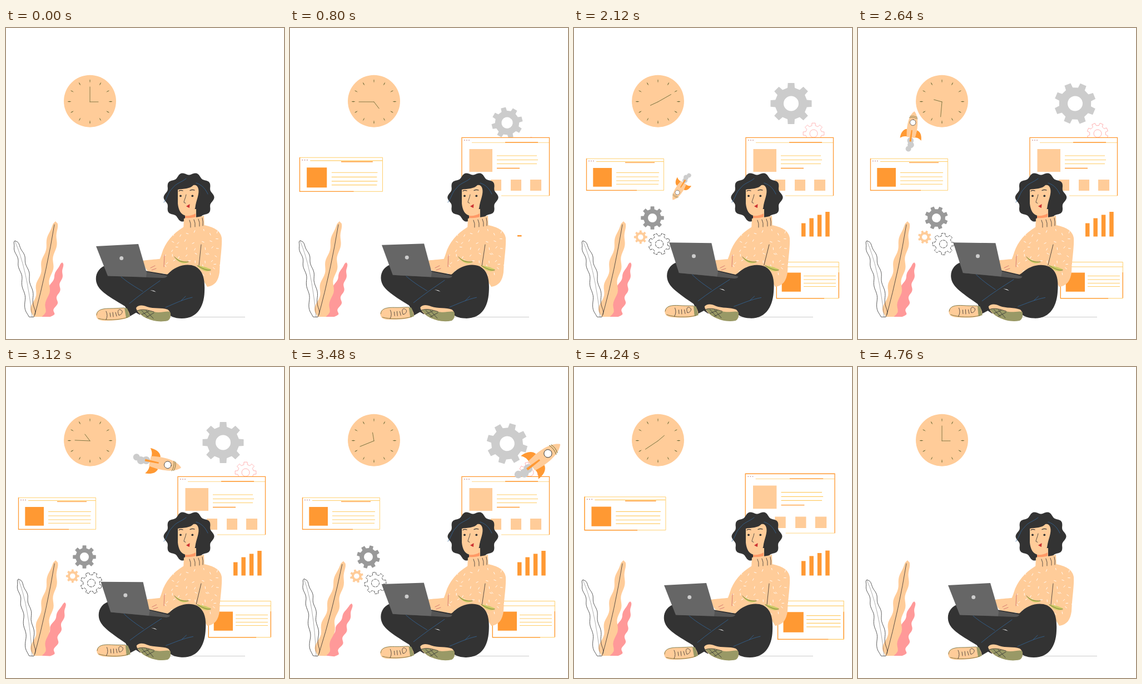
An HTML page for the animation above (4.8 s loop, 500x560 px).

```html
<!DOCTYPE html>
<html lang="en">
<head>
<meta charset="utf-8">
<title>Working with a laptop</title>
<style>
html, body { margin: 0; width: 100%; height: 100%; overflow: hidden; background: #fff; }
svg { display: block; width: 500px; height: 560px; }
.ln { fill: none; stroke: #333; stroke-width: .8; stroke-linecap: round; stroke-linejoin: round; }
.blue { stroke: #369; }
.olive { stroke: #663; }
.rose { stroke: #c66; }
.bold { stroke-width: 1.3; }
.yellow { stroke: #fc6; }
.orange { stroke: #f93; stroke-width: 1.3; }
.dots { stroke: #c99; stroke-width: 1.8; stroke-linecap: round; stroke-dasharray: 0 4; }
</style>
</head>
<body>
<svg viewBox="0 0 500 560" xmlns="http://www.w3.org/2000/svg">
  <path d="M290 520.5H430" stroke="#ccc"/>

  <circle cx="151" cy="131.7" r="47" fill="#fc9"/>
  <g id="ticks" fill="#663"></g>
  <path id="minute" class="ln olive" d="M151 133V106"/>
  <path id="hour" class="ln olive" d="M151 133V118"/>

  <path id="bigGear" fill="#ccc" fill-rule="evenodd"/>
  <path id="rimGear" fill="#fff" stroke="#f99" stroke-width=".7" fill-rule="evenodd"/>

  <g id="winR" fill="none">
    <path d="M309 197H467V302H309Z" fill="#fff"/>
    <path class="yellow" d="M327 206.3H466M380 302H466" stroke-width=".8"/>
    <path class="yellow" d="M372 230H444M372 237.5H446M372 244.5H444" stroke-width="1.2"/>
    <path class="orange" d="M309 302V197.3H466.5V302M387 206H446M372 252.5H413"/>
    <path class="dots" d="M314 202h9"/>
    <path d="M322.5 218h41.5v41h-41.5zM361 273h19v20h-19zM397 273h19v20h-19zM432 273h20v20h-20z" fill="#fc9"/>
  </g>

  <g id="winL" fill="none">
    <path class="yellow" d="M22.5 235.3H161.5V292.3H22.5Z" fill="#fff" stroke-width=".9"/>
    <path class="yellow" d="M40 240.5H161M76 260.5H153M76 268H152M76 275H153M76 281.3H152" stroke-width="1.1"/>
    <path class="orange" d="M22.5 235V292.3H113M92 242.3H145"/>
    <path class="dots" d="M27 239.5h9"/>
    <path d="M34.3 252h33.7v33.7h-33.7z" fill="#f93"/>
  </g>

  <g id="winB" fill="none">
    <path class="yellow" d="M364.3 421.5H476.3V486.8H364.3Z" fill="#fff"/>
    <path class="yellow" d="M380 430H476M413 446.5H471M413 453H471M413 459.5H471M413 465.5H471" stroke-width="1.2"/>
    <path class="orange" d="M364.3 422V486.8H450M476.3 440V486"/>
    <path d="M373.7 440.5h34.3v34.3h-34.3z" fill="#f93"/>
  </g>

  <g id="bars" fill="#f93"></g>

  <path id="pinkLeaf" fill="#f99"/>
  <g id="tanLeaf">
    <path id="tanShape" fill="#fc9"/>
    <path class="ln" d="M87 354Q74 434 52 516"/>
  </g>
  <g id="rimLeaf">
    <path id="rimShape" class="ln"/>
    <path class="ln" d="M16 384Q37 430 47 520" stroke-opacity=".5"/>
  </g>

  <g id="gears">
    <path id="darkGear" fill="#999" fill-rule="evenodd"/>
    <path id="tanGear" fill="#fc9" fill-rule="evenodd"/>
    <path id="lineGear" fill="#fff" stroke="#333" stroke-width=".8" stroke-dasharray="5 1.2" fill-rule="evenodd"/>
  </g>

  <g id="rocket">
    <g fill="#ccc"><circle cx="-20" r="7"/><circle cx="-29" cy="2" r="7"/><circle cx="-38" cy="-2" r="6"/></g>
    <path d="M4-11C2-20-8-23-17-23C-12-17-12-13-12-8ZM4 11C2 20-8 23-17 23C-12 17-12 13-12 8Z" fill="#f93"/>
    <path d="M44 0C36-9 16-14-13-9L-13 9C16 14 36 9 44 0Z" fill="#fc9"/>
    <path d="M-22-2L3-1.3V1.3L-22 2Z" fill="#f93"/>
    <path class="ln olive" d="M29-9Q32 0 29 9M32-8Q35 0 32 8"/>
    <circle class="ln" cx="19.5" r="6.3" style="fill:#fff"/>
  </g>

  <clipPath id="knit"><path id="knitShape"/></clipPath>
  <path id="hair" fill="#333"/>
  <g id="hand">
    <path d="M246 419C258 417 270 417 290 414L296 442L262 442C254 439 250 433 246 419Z" fill="#fc9"/>
    <path class="ln rose" d="M260 432L268 428M262 436L270 433"/>
  </g>
  <path id="sweater" fill="#fc9"/>
  <path id="flecks" fill="none" stroke="#fff" stroke-width=".9" clip-path="url(#knit)"/>
  <path d="M322 326H342V345H322Z" fill="#fc9"/>
  <path d="M322 338Q333 339 341 334V340Q332 344 322 342Z" fill="#f96"/>
  <path d="M320 343C331 342 345 341 356 338L357 362L319 363Z" fill="#fc9"/>
  <path class="ln" d="M330 346Q333 352 332 359M338 345Q341 351 340 358M346 344Q349 350 348 357M353 342Q355 349 354 356"/>
  <path class="ln rose" d="M285 409L284 430"/>
  <path id="armLine" class="ln" d="M351 390L347 428"/>
  <path d="M303 412C311 418 318 421 329 421C319 427 309 422 303 412ZM343 427C352 429 360 430 369 435C363 441 352 438 343 427Z" fill="#cc6"/>
  <path class="ln olive" d="M303 412C309 420 317 422 328 421M344 428C353 433 361 437 368 436"/>

  <path d="M309 291C319 289 331 290 337 283C344 281 348 289 346 299C345 306 342 312 341 319C340 332 332 338 324 338C315 337 310 328 309 316Z" fill="#fc9"/>
  <path class="ln bold" d="M311 293.500Q314 291.500 318 293M331 292.500Q335 290.500 339 292"/>
  <path class="ln" d="M324 300C323 306 320 311 320 314L323 315.500"/>
  <g fill="#333"><circle cx="314" cy="302.300" r="1.900"/><circle cx="335.300" cy="302.300" r="1.900"/></g>
  <path d="M324 321L330.500 317L330 324Q327 323 324 321Z" fill="#c33"/>
  <path class="ln blue" d="M284 314C291 305 291 296 299 289C306 279 316 278 324 271M342 279C354 283 359 291 363 299"/>

  <g id="legL">
    <path d="M183 426C164 431 158 448 164 462C170 476 190 487 240 516L290 510L272 481L298 445Z" fill="#333"/>
    <path class="ln blue" d="M207 448C222 461 239 470 256 480"/>
  </g>
  <g id="legR">
    <path d="M213 499L224 490L291 443C305 428 325 423 340 429C355 437 358 453 357 475C356 502 344 523 316 523C302 523 290 518 284 505L252 502L223 519Z" fill="#333"/>
    <path d="M259 472L270 475.500L266 473Z" fill="#fff"/>
    <path class="ln blue" d="M222 496C240 481 257 469 277 455M287 503C302 497 317 489 335 485M315 491L323 483"/>
  </g>
  <g id="lap">
    <path d="M162 517C163 507 174 505 188 505C200 505 210 503 217 505Q224 515 222 520C212 526 194 527 178 527C168 527 163 525 162 517Z" fill="#fc9"/>
    <path d="M213 504L218 505L223 520L216 522Z" fill="#996"/>
    <path class="ln olive" d="M163 517C163 507 174 505 188 505C200 505 207 504 213 504M166 523C180 527 203 526 219 521"/>
    <path class="ln" d="M180 510Q184 518 180 525M187 513L188 520M192 512L193 520M197 512L199 519M203 517C199 509 203 505 207 508C212 510 207 518 203 517"/>
    <path d="M183 446.500L252 439L290 446Q289 450 282 450Z" fill="#555"/>
    <path d="M162 393L238 389L253 440.500L252 448.500L183 446.500Z" fill="#666"/>
    <circle cx="207.700" cy="414.500" r="3.500" fill="#ccc"/>
  </g>
  <g id="shoeR">
    <path d="M234 504C238 498 247 499 254 502C266 506 280 503 291 507C298 512 297 522 292 526C275 531 256 526 245 518C238 513 235 509 234 504Z" fill="#fc9"/>
    <path d="M236 509C246 505 255 508 266 511C278 514 287 509 295 511C297 518 296 524 291 527C274 531 258 526 246 519Z" fill="#996"/>
    <path class="ln" d="M244 509L256 521M252 509L265 523M244 516L257 510M252 521L266 513M236 509C246 505 255 508 266 511"/>
  </g>
</svg>
<script>
const LOOP = 4800, RAD = Math.PI / 180;
const $ = id => document.getElementById(id);
const clamp = v => Math.max(0, Math.min(1, v));
const span = (t, a, b) => clamp((t - a) / (b - a));
const sine = p => (1 - Math.cos(Math.PI * p)) / 2;
const outCubic = p => 1 - (1 - p) ** 3;
const outBack = (p, s = 1.70158) => 1 + (s + 1) * (p - 1) ** 3 + s * (p - 1) ** 2;
// 0..1 while entering from a to b, back to 0 while leaving from c to d
const inOut = (t, a, b, c, d) => Math.min(span(t, a, b), 1 - span(t, c, d));
const pulse = (t, a, b) => Math.sin(Math.PI * span(t, a, b)) ** 2;
const set = (id, value, name = 'transform') => $(id).setAttribute(name, value);
const turn = (id, deg, x, y) => set(id, `rotate(${deg} ${x} ${y})`);
const zoom = (k, x, y) => `translate(${x} ${y}) scale(${Math.max(k, 0)}) translate(${-x} ${-y})`;
const show = (id, on) => set(id, on ? 'inline' : 'none', 'display');
const polygon = pts => 'M' + pts.map(p => p.map(v => v.toFixed(1)).join(' ')).join('L') + 'Z';
const polar = (r, deg, x = 0, y = 0) => [x + r * Math.cos(deg * RAD), y + r * Math.sin(deg * RAD)];

// Wavy leaf around a curved spine, from base to tip
function leaf(base, bend, tip, wide, taper) {
  const side = s => Array.from({ length: 41 }, (_, i) => {
    const u = i / 40;
    const [x, y] = [0, 1].map(k => (1 - u) ** 2 * base[k] + 2 * u * (1 - u) * bend[k] + u * u * tip[k]);
    const ends = Math.sqrt(Math.min(1, u * 12 + .3) * (1 - u ** 12));
    return [x + s * wide * (1 - taper * u) * ends * (1 + .2 * Math.sin(26 * u + s)), y];
  });
  return polygon([...side(-1), ...side(1).reverse()]);
}

function gear(R, root, hole) {
  const pts = [];
  for (let a = 0; a < 360; a += 45) {
    pts.push(polar(root, a - 13), polar(R, a - 9), polar(R, a + 9), polar(root, a + 13));
  }
  const half = x => `A${hole} ${hole} 0 1 0 ${x} 0`;
  return polygon(pts) + `M${hole} 0${half(-hole)}${half(hole)}Z`;
}

function build() {
  set('rimShape', leaf([45, 520], [36, 430], [16, 383], 8, .2), 'd');
  set('tanShape', leaf([56, 520], [73, 434], [89, 348], 13, .42), 'd');
  set('pinkLeaf', leaf([70, 520], [86, 475], [101, 422], 15, .7), 'd');

  const curls = Array.from({ length: 180 }, (_, i) => polar(43 + 2.5 * Math.cos(i * 20 * RAD), i * 2, 329, 305));
  set('hair', polygon(curls), 'd');

  const knit = 'M320 358C300 370 286 386 280 407C277 416 274 420 275 432L290 448L352 450L362 466C376 464 382 455 384 440C385 415 389 394 388 378C386 364 372 358 356 355Z';
  set('sweater', knit, 'd');
  set('knitShape', knit, 'd');

  let seed = 7, flecks = '';
  const rnd = () => (seed = seed * 16807 % 2147483647) / 2147483647;
  for (let i = 0; i < 56; i++) {
    const [dx, dy] = polar(4.5, rnd() * 360);
    flecks += `M${280 + i % 8 * 14 + rnd() * 9} ${365 + Math.floor(i / 8) * 13 + rnd() * 9}l${dx} ${dy}`;
  }
  set('flecks', flecks, 'd');

  for (let a = 0; a < 360; a += 30) {
    $('ticks').innerHTML += `<path d="M151 92Q152.300 95 151 99Q149.700 95 151 92Z" transform="rotate(${a} 151 132.500)"/>`;
  }
  for (let i = 0; i < 4; i++) {
    $('bars').innerHTML += `<rect id="bar${i}" x="${409 + 14.4 * i}" width="7.500"/>`;
  }

  set('bigGear', gear(37.5, 29, 13.5), 'd');
  set('rimGear', gear(19, 14.5, 7), 'd');
  set('darkGear', gear(21, 16, 8), 'd');
  set('tanGear', gear(12, 9, 4.8), 'd');
  set('lineGear', gear(19.5, 15, 7), 'd');
}

// Rocket: time, place and heading at each turn
const turns = [
  [1360, 175, 312, 200], [1520, 133, 294, 200], [2120, 193, 285, 122], [2620, 95, 200, 275],
  [3120, 271, 172, 12], [3800, 433, 47, 239], [4000, 362, -72, 239],
];
function along(t) {
  const i = Math.max(1, turns.findIndex(k => t < k[0]));
  const a = turns[i - 1], b = turns[i], gap = b[0] - a[0], u = (t - a[0]) / gap;
  const push = i === 1 || i === turns.length - 1 ? .3 : .7;
  const v = polar(gap * push, a[3]), w = polar(gap * push, b[3]);
  return [0, 1].map(k => (1 + 2 * u) * (1 - u) ** 2 * a[k + 1] + u * (1 - u) ** 2 * v[k]
    + u * u * (3 - 2 * u) * b[k + 1] + u * u * (u - 1) * w[k]);
}

function drawRocket(t) {
  const on = t > 1365 && t < 3995;
  show('rocket', on);
  if (!on) return;
  const [x, y] = along(t), [x0, y0] = along(t - 2), [x1, y1] = along(t + 2);
  const size = span(t, 1360, 1480) * Math.min(1.15, .43 + .00036 * (t - 1520));
  set('rocket', `translate(${x} ${y}) rotate(${Math.atan2(y1 - y0, x1 - x0) / RAD}) scale(${size})`);
}

function drawGears(t) {
  const spin = (t - 2120) * .045;
  const big = outCubic(inOut(t, 600, 1140, 3400, 3740));
  set('bigGear', `${zoom(big, 390.5, 276)} translate(390.5 136) rotate(${spin})`);
  const rim = outCubic(inOut(t, 740, 1180, 3620, 3960));
  set('rimGear', `translate(431 ${230 - 40 * rim}) rotate(${-spin})`);
  show('rimGear', rim > 0);
  const grow = (a, b) => outCubic(span(t, a, b));
  set('darkGear', `${zoom(grow(1370, 1820), 142, 357)} translate(141 342) rotate(${spin})`);
  set('tanGear', `${zoom(grow(1080, 1560), 127, 384)} translate(119.8 376.5) rotate(${-spin})`);
  set('lineGear', `${zoom(grow(1000, 1450), 160, 392)} translate(153.5 389) rotate(${spin + 22})`);
  set('gears', 1 - span(t, 3680, 3920), 'opacity');
}

function drawPanels(t) {
  const low = inOut(t, 1330, 2110, 4100, 4700);
  set('winR', zoom(outBack(inOut(t, 100, 560, 4100, 4700), .8), 345, 440));
  set('winL', zoom(outBack(inOut(t, 445, 935, 4120, 4700)), 92, 264));
  set('winB', zoom(outBack(low), 326, 426));
  set('winB', clamp(low / .4), 'opacity');
  for (let i = 0; i < 4; i++) {
    const start = 785 + 215 * i, end = 4080 + 40 * i;
    const p = inOut(t, start, start + 680, end, end + 480);
    const h = Math.max(0, (24 + 20.5 * (i / 3) ** .75) * outBack(p));
    set('bar' + i, 375.5 - h, 'y');
    set('bar' + i, h, 'height');
  }
}

function drawPlants(t) {
  turn('rimLeaf', 4.6 * (pulse(t, 640, 1740) + pulse(t, 2840, 3860)), 46, 520);
  turn('tanLeaf', 2.7 * (pulse(t, 960, 2100) + pulse(t, 3060, 4160)), 56, 520);
  turn('pinkLeaf', 5.8 * (pulse(t, 860, 2100) + pulse(t, 2800, 4120)), 68, 520);
}

function drawWoman(t) {
  const lift = sine(span(t, 520, 1240)) - sine(span(t, 2970, 3780));
  turn('legL', 3.75 * lift, 270, 531);
  turn('lap', 3.75 * lift, 270, 531);
  turn('legR', 2.5 * lift, 325, 520);
  turn('shoeR', 2.5 * lift, 290, 520);
  turn('armLine', 8 * lift, 351, 390);
  set('hand', `translate(${3 * lift} 0)`);
  const puff = sine(span(t, 560, 1400)) - sine(span(t, 2300, 3200));
  set('hair', `translate(329 0) scale(${1 + .025 * puff} 1) translate(-329 0)`);
}

function draw(t) {
  const hours = 12 * span(t, 125, 4760);
  turn('minute', hours * 360, 151, 133);
  turn('hour', 90 + hours * 30, 151, 133);
  drawPlants(t);
  drawWoman(t);
  drawPanels(t);
  drawGears(t);
  drawRocket(t);
}

build();
const begin = performance.now();
function tick() {
  draw((performance.now() - begin) % LOOP);
  requestAnimationFrame(tick);
}
tick();
</script>
</body>
</html>
```
